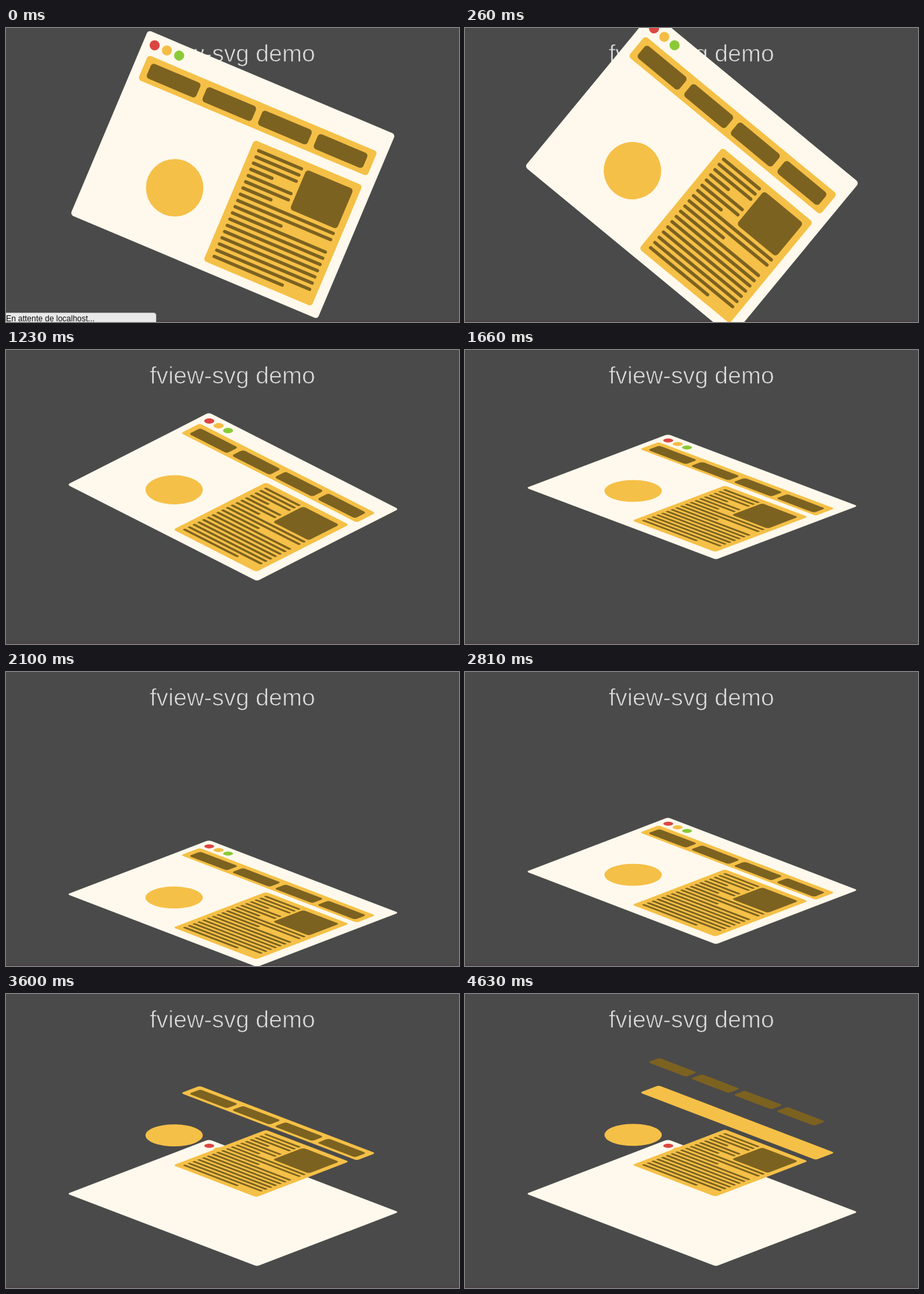
These frames come from a looping animation (675 by 438 pixels, 6.97 s). An HTML page:

```html
<!DOCTYPE html>
<html lang="en">
<head>
<meta charset="utf-8">
<title>fview-svg demo</title>
<style>
  html, body { margin: 0; width: 100%; height: 100%; overflow: hidden; background: #4a4a4a; }
  svg { display: block; width: 100%; height: 100%; }
  /* the background-coloured stroke thins the letters to a light weight */
  .title {
    font: 35.5px "Liberation Sans", Arial, sans-serif; text-anchor: middle;
    fill: #dedede; stroke: #4a4a4a; stroke-width: .75;
  }
  .status { font: 12px "Liberation Sans", Arial, sans-serif; fill: #111; }
  .paper { fill: #fef9ec; }
  .gold { fill: #f5c047; }
  .brown { fill: #7c6220; }
  .lines { fill: none; stroke: #7c6220; stroke-width: 5; stroke-linecap: round; }
</style>
</head>
<body>
<svg viewBox="0 0 675 438">
  <rect width="675" height="438" fill="#4a4a4a"/>
  <rect y="435" width="675" height="3" fill="#4b4446"/>
  <text class="title" x="337.5" y="50">fview-svg demo</text>

  <g id="page">
    <rect class="paper" x=".3" width="399.7" height="298.5" rx="5"/>
    <circle cx="18" cy="17" r="7.5" fill="#dc4641"/>
    <circle cx="37.8" cy="17" r="7.5" fill="#f5bd45"/>
    <circle cx="57.6" cy="17" r="7.5" fill="#8bca37"/>
  </g>

  <g id="logo"><circle class="gold" cx="128" cy="201" r="42.8"/></g>

  <g id="article">
    <rect class="gold" x="209.5" y="89" width="175" height="195.5" rx="5"/>
    <rect class="brown" x="298.5" y="99.5" width="76" height="64.5" rx="5"/>
    <path class="lines" id="lines"/>
  </g>

  <g id="bar"><rect class="gold" x="14.8" y="34" width="370.7" height="39.7" rx="5"/></g>

  <g id="tabs" class="brown">
    <rect x="24.5" y="42.5" width="80" height="24" rx="5"/>
    <rect x="114.5" y="42.5" width="80" height="24" rx="5"/>
    <rect x="204.5" y="42.5" width="80" height="24" rx="5"/>
    <rect x="294.5" y="42.5" width="80" height="24" rx="5"/>
  </g>

  <g id="status">
    <path d="M-1 424.5 H220 Q223.5 424.5 223.5 428 V439 H-1 Z" fill="#e9e8e9" stroke="#bdbdbd"/>
    <text class="status" x="0" y="437">En attente de localhost...</text>
  </g>
</svg>
<script>
  const LOOP = 6970, TICK = 87.4;
  const STARTS = { spin: -41, tilt: 958, drop: 1953, lift: 2941, tabs: 3930 };
  const $ = id => document.getElementById(id);

  // right end of each text row
  const ends = [291, 291, 291, 256, 291, 291, 267, 372, 372, 296, 372, 372, 372, 372, 372, 372, 372, 332];
  $('lines').setAttribute('d', ends.map((x, i) => `M222 ${101.5 + i * 10.05}H${x}`).join(''));

  function outElastic(t) {
    if (t <= 0) return 0;
    if (t >= 1) return 1;
    return 1 - 2 ** (-10 * t) * Math.cos(t * 2 * Math.PI / 0.3);
  }

  function place(id, z, spin, tilt) {
    const y = 219 - Math.sin(tilt) * z;
    $(id).setAttribute('transform',
      `translate(337.5 ${y}) scale(1 ${Math.cos(tilt)}) rotate(${spin}) translate(-200 -150)`);
  }

  function draw(ms) {
    const step = Math.floor((ms + 8) / TICK);
    const time = step * TICK;
    const ease = name => outElastic((time - STARTS[name]) / 1000);

    const spin = 45 * ease('spin');
    const tilt = 3 * Math.PI / 8 * ease('tilt');
    const base = -100 * ease('drop');
    const mid = base + 100 * ease('lift');

    // layers float slightly above the page
    place('page', base, spin, tilt);
    place('logo', mid + 3.7, spin, tilt);
    place('article', mid + 3.7, spin, tilt);
    place('bar', mid + 1.5, spin, tilt);
    place('tabs', mid + 1 + 50 * ease('tabs'), spin, tilt);
    $('status').style.display = step < 1 ? '' : 'none';
  }

  const origin = performance.now();
  function frame() {
    draw((performance.now() - origin) % LOOP);
    requestAnimationFrame(frame);
  }
  frame();
</script>
</body>
</html>
```
